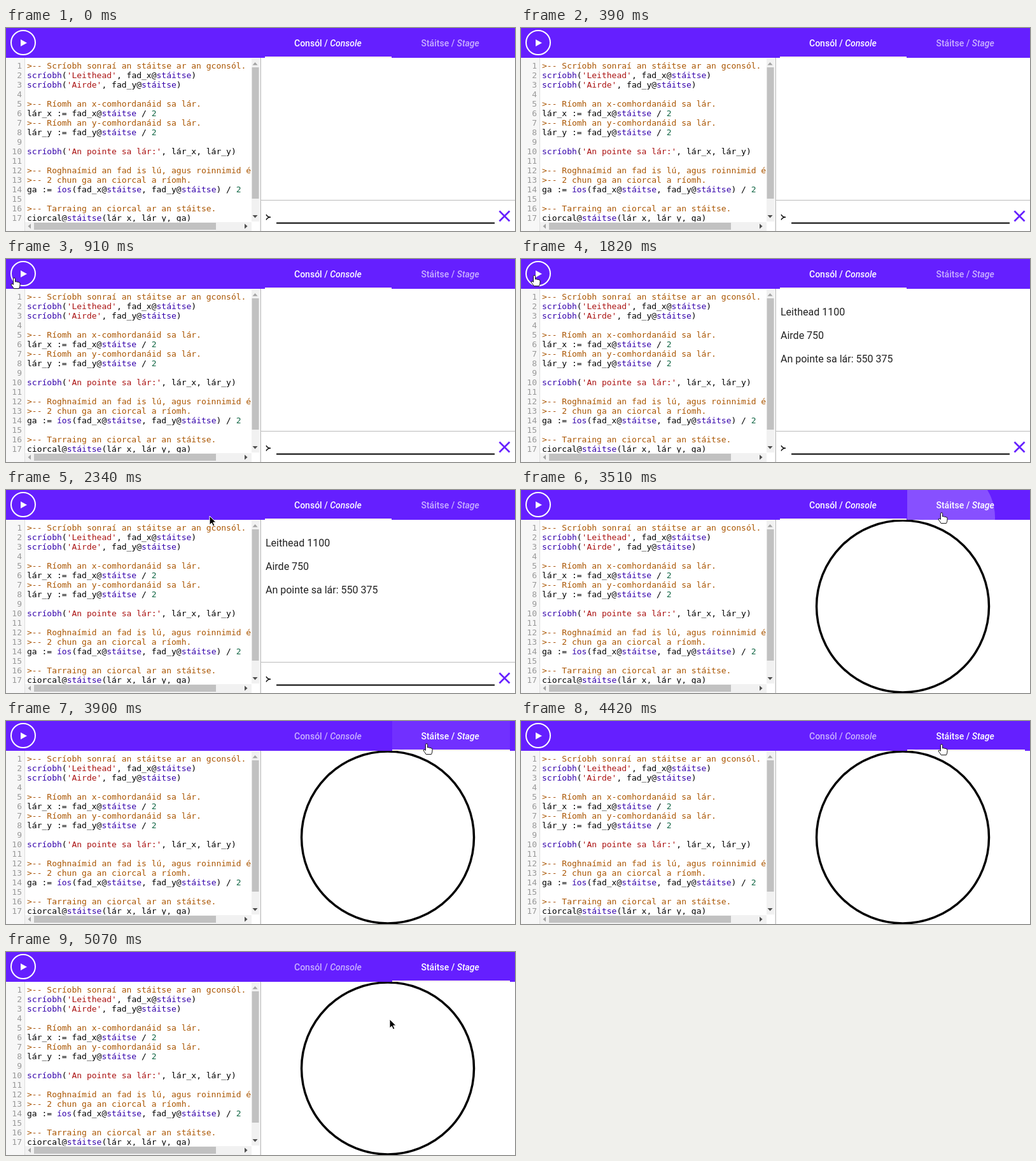
These frames come from a looping animation (800x320 px, 5.2 s). An HTML page:

```html
<!DOCTYPE html>
<html lang="ga">
<head>
<meta charset="utf-8">
<style>
html, body { margin: 0; width: 800px; height: 320px; overflow: hidden; background: #fff; }
svg { display: block; }
text { white-space: pre; }
.code text { font: 13px "DejaVu Sans Mono", monospace; fill: #000; }
.code .num { fill: #999; text-anchor: end; }
.code .comment { fill: #a50; }
.code .string { fill: #a11; }
.code .builtin { fill: #30a; }
.code .digit { fill: #164; }
.out text { font: 16px Roboto, sans-serif; fill: #212121; }
.tab { font: 500 14px Roboto, sans-serif; fill: #fff; }
.tab tspan { font-style: italic; }
</style>
</head>
<body>
<svg width="800" height="320" viewBox="0 0 800 320">
  <defs>
    <clipPath id="codeClip"><rect x="30" y="48" width="356" height="257.5"/></clipPath>
    <clipPath id="gutterClip"><rect y="48" width="30" height="258"/></clipPath>
    <clipPath id="tabClip"><rect x="607" width="185" height="47"/></clipPath>
  </defs>
  <rect width="800" height="320" fill="#fff"/>

  <!-- editor -->
  <rect y="47" width="29" height="273" fill="#f7f7f7"/>
  <rect x="29" y="47" width="1" height="273" fill="#ddd"/>
  <g class="code">
    <g id="nums" clip-path="url(#gutterClip)"></g>
    <g id="lines" clip-path="url(#codeClip)"></g>
  </g>
  <rect x="386" y="48" width="12" height="257" fill="#f1f1f1"/>
  <rect x="386.5" y="62" width="11" height="207" fill="#c1c1c1"/>
  <path d="M387.5 58.5h8l-4-4.5z" fill="#a3a3a3"/>
  <path d="M387.5 295h8l-4 4.5z" fill="#505050"/>
  <rect x="30" y="306" width="356" height="14" fill="#f1f1f1"/>
  <rect x="44" y="307" width="286" height="11" fill="#c1c1c1"/>
  <path d="M39 308.5v8l-4.5-4z" fill="#a3a3a3"/>
  <path d="M375 308.5v8l4.5-4z" fill="#505050"/>
  <rect x="399.5" y="47" width="1.5" height="273" fill="#c4c4c4"/>

  <!-- console -->
  <g id="console">
    <g class="out" id="out">
      <text x="408" y="88.5">Leithead 1100</text>
      <text x="408" y="125.5">Airde 750</text>
      <text x="408" y="162.5">An pointe sa lár: 550 375</text>
    </g>
    <rect x="401" y="271" width="399" height="1" fill="#bbb"/>
    <path d="M409 294q1.500 4 7 4.200q-5.500.200-7 4.200" fill="none" stroke="#111" stroke-width="1.500"/>
    <rect x="425" y="306.500" width="343" height="2" fill="#000"/>
    <path d="M775.500 288.500l16 16m0-16l-16 16" stroke="#651fff" stroke-width="2.600"/>
  </g>

  <!-- stage -->
  <circle id="stage" cx="600" cy="183.500" r="135.500" fill="none" stroke="#000" stroke-width="3.500"/>

  <!-- header -->
  <rect width="800" height="47" fill="#651fff"/>
  <circle cx="27" cy="23" r="19" fill="none" stroke="#fff" stroke-width="2"/>
  <path d="M23 18v11l10-5.500z" fill="#fff"/>
  <g clip-path="url(#tabClip)"><circle id="ripple" cx="662" cy="43" fill="#fff"/></g>
  <text class="tab" id="tabA" x="453" y="29">Consól / <tspan>Console</tspan></text>
  <text class="tab" id="tabB" x="652.500" y="29">Stáitse / <tspan>Stage</tspan></text>
  <rect id="bar" y="45" height="2" fill="#fff3ee"/>

  <g id="cursor">
    <path id="hand" fill="#fff" stroke="#111" stroke-linejoin="round" d="M-1.600 10V1.400a1.600 1.600 0 0 1 3.200 0V6q1.600-1 3 .4 1.600-.8 2.600.6 1.800-.4 1.800 1.600V11q0 3-1.600 5.600H-.8Q-2.400 13.600-4.600 11.200q-.8-1.800.6-2.200 1.200 0 2.400 1.400z"/>
    <path id="arrow" fill="#000" stroke="#fff" d="M0 0V14l3.300-3 2.200 5 2.400-1-2.200-5h4.300z"/>
  </g>
</svg>
<script>
const $ = id => document.getElementById(id);
const LOOP = 5200, STEP = 130, RUN = 1430, CLICK = 3510;

const program = `>-- Scríobh sonraí an stáitse ar an gconsól.
scríobh('Leithead', fad_x@stáitse)
scríobh('Airde', fad_y@stáitse)

>-- Ríomh an x-comhordanáid sa lár.
lár_x := fad_x@stáitse / 2
>-- Ríomh an y-comhordanáid sa lár.
lár_y := fad_y@stáitse / 2

scríobh('An pointe sa lár:', lár_x, lár_y)

>-- Roghnaímid an fad is lú, agus roinnimid é
>-- 2 chun ga an ciorcal a ríomh.
ga := íos(fad_x@stáitse, fad_y@stáitse) / 2

>-- Tarraing an ciorcal ar an stáitse.
ciorcal@stáitse(lár_x, lár_y, ga)`;

const kinds = ['comment', 'string', 'builtin', 'digit'];
const token = /(>--.*)|('[^']*')|(scríobh|stáitse|íos)|(\b\d+\b)/g;

function addText(parent, x, y, cls) {
  const el = document.createElementNS('http://www.w3.org/2000/svg', 'text');
  el.setAttribute('x', x);
  el.setAttribute('y', y);
  if (cls) el.setAttribute('class', cls);
  parent.append(el);
  return el;
}

program.split('\n').forEach((line, i) => {
  const y = 64 + 15 * i;
  addText($('nums'), 25, y, 'num').textContent = i + 1;
  addText($('lines'), 33, y).innerHTML = line.replace(token, (s, ...groups) => {
    const kind = kinds[groups.slice(0, 4).findIndex(Boolean)];
    return `<tspan class="${kind}">${s.replace('>', '&gt;')}</tspan>`;
  });
});

// Pointer path: time, x, y
const path = [
  [520, -14, 52], [780, 5, 36], [910, 13, 30], [1040, 21, 26], [1950, 21, 26],
  [2080, 60, 30], [2210, 170, 36], [2340, 320, 41], [2470, 470, 44], [2600, 570, 44],
  [2730, 625, 44], [2860, 649, 43], [2990, 657, 39], [3120, 661, 36], [4290, 661, 36],
  [4420, 661, 37], [4550, 655, 43], [4680, 640, 60], [4810, 622, 84], [4940, 609, 101],
  [5070, 603, 106]
];

const clamp = v => Math.min(1, Math.max(0, v));
const mix = (a, b, p) => a + (b - a) * p;
const show = (id, on) => $(id).setAttribute('visibility', on ? 'visible' : 'hidden');
const set = (id, attrs) => {
  for (const k in attrs) $(id).setAttribute(k, attrs[k]);
};

function pointerAt(t) {
  const i = path.findIndex(p => p[0] >= t);
  if (i <= 0) return path[0].slice(1);
  const [t0, x0, y0] = path[i - 1], [t1, x1, y1] = path[i];
  const p = (t - t0) / (t1 - t0);
  return [mix(x0, x1, p), mix(y0, y1, p)];
}

function draw(t) {
  const clicked = t >= CLICK;
  const since = t - CLICK;

  $('console').style.display = clicked ? 'none' : '';
  $('out').style.display = t >= RUN ? '' : 'none';
  show('stage', clicked);

  const p = clamp(since / 250), slide = p * p * (3 - 2 * p);
  set('bar', { x: mix(407, 607, slide), width: mix(199, 185, slide) });
  set('tabA', { 'fill-opacity': mix(1, .65, clamp(since / 200)) });
  set('tabB', { 'fill-opacity': clicked ? 1 : .65 });
  set('ripple', {
    r: mix(83, 190, clamp(since / 150)),
    'fill-opacity': clicked ? .22 * (1 - clamp((since - 130) / 390)) : 0
  });

  const [x, y] = pointerAt(t);
  const onButton = Math.hypot(x - 27, y - 23) < 21;
  const onTab = x > 407 && x < 792 && y < 47;
  set('cursor', { transform: `translate(${x} ${y})` });
  show('hand', onButton || onTab);
  show('arrow', !onButton && !onTab);
}

const start = performance.now();
function tick() {
  const t = (performance.now() - start) % LOOP;
  draw(Math.floor(t / STEP) * STEP);
  requestAnimationFrame(tick);
}
draw(0);
requestAnimationFrame(tick);
</script>
</body>
</html>
```
